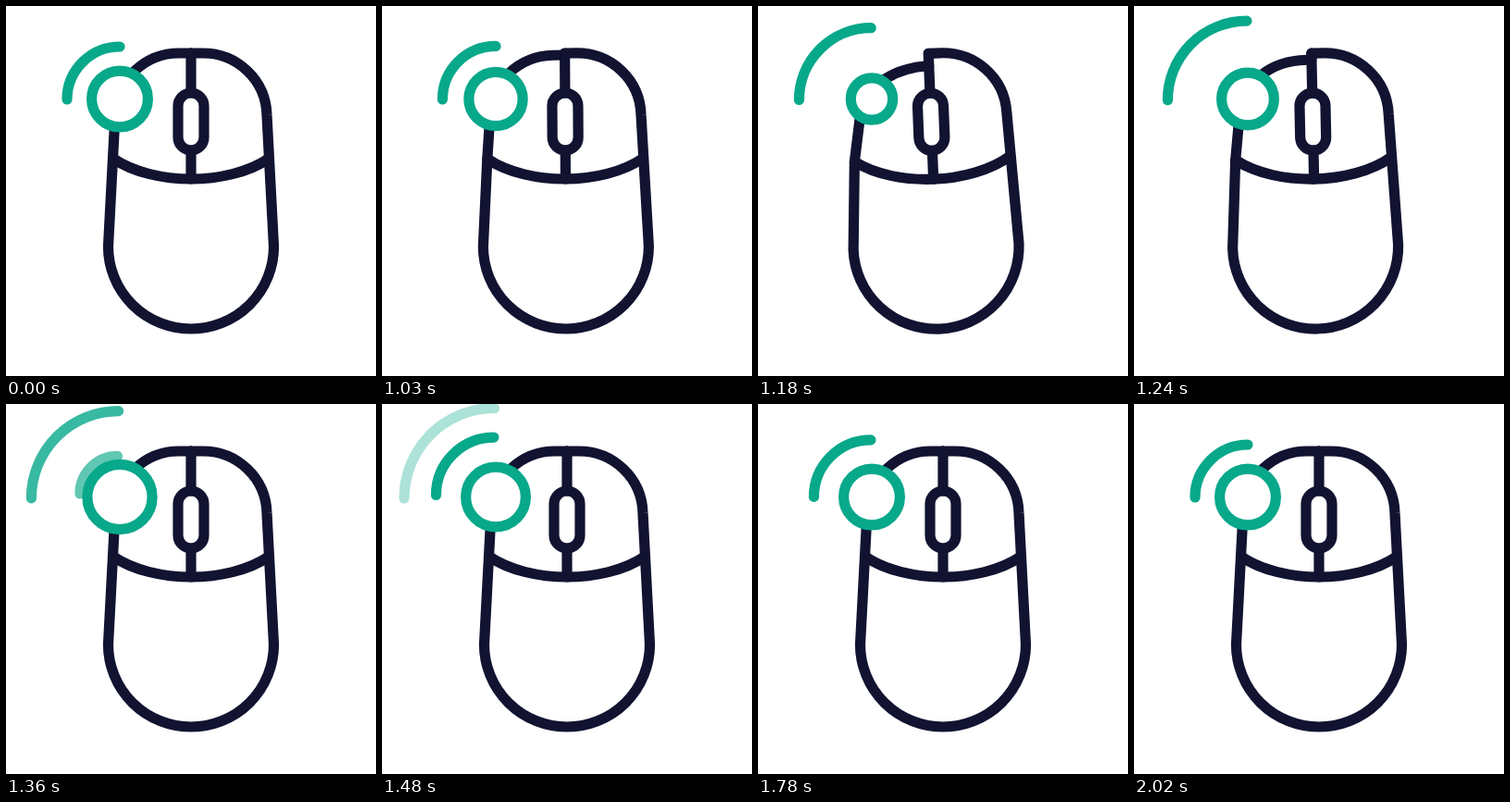
Recreate the animation shown at these times as an HTML page. Size 400x400 px, loop 2.05 s.

```html
<!DOCTYPE html>
<html lang="en">
<head>
<meta charset="utf-8">
<title>Mouse click</title>
<style>
  html, body { margin: 0; width: 100%; height: 100%; overflow: hidden; background: #fff; }
  svg { display: block; width: 100%; height: 100%; }
  svg * { stroke-width: 11.2; stroke-linecap: round; stroke-linejoin: round; }
  #mouse { fill: none; stroke: #121331; }
  #click { fill: none; stroke: #08a88a; }
  #dot { fill: #fff; }
</style>
</head>
<body>
<svg viewBox="0 0 400 400">
  <g id="mouse">
    <path d="M115.5 165 L110.5 260 A89.5 89 0 0 0 289.5 260 L282 118 C281 80 250 51 213 51 H200"/>
    <path id="button"/>
    <path d="M116 165 C138 180 170 187 200 187 S262 180 284 165"/>
    <path d="M200 51 V94 M200 156 V187"/>
    <rect x="186" y="94" width="28" height="62" rx="14"/>
  </g>
  <g id="click">
    <path id="oldWave"/>
    <path id="newWave"/>
    <circle id="dot" cx="123" cy="100.5"/>
  </g>
</svg>
<script>
const LOOP = 2050, START = 1030, STEP = 30;
const el = id => document.getElementById(id);
const mix = (a, b, k) => a + (b - a) * k;
const clamp = k => Math.min(1, Math.max(0, k));

// Cubic Bezier easing, solved by bisection
function bezier(x1, y1, x2, y2) {
  const at = (a, b, u) => 3 * (1 - u) ** 2 * u * a + 3 * (1 - u) * u * u * b + u ** 3;
  return x => {
    let lo = 0, hi = 1;
    for (let i = 0; i < 24; i++) {
      const mid = (lo + hi) / 2;
      if (at(x1, x2, mid) < x) lo = mid; else hi = mid;
    }
    return at(y1, y2, lo);
  };
}
const linear = k => k;
const smooth = k => k * k * (3 - 2 * k);
const settle = bezier(.28, 0, .25, 1);
const burst = bezier(.3, .2, .4, 1);

// Track: [time, value, easing towards this value]
function track(keys, t) {
  if (t <= keys[0][0]) return keys[0][1];
  for (let i = 1; i < keys.length; i++) {
    const [t0, v0] = keys[i - 1], [t1, v1, ease] = keys[i];
    if (t <= t1) return mix(v0, v1, ease(clamp((t - t0) / (t1 - t0))));
  }
  return keys[keys.length - 1][1];
}

const PRESS = [[1000, 0], [1133, 1, smooth], [1333, 0, smooth]];
const DOT = [[1000, 30.4], [1133, 20.8, smooth], [1340, 35.2, smooth], [1590, 30.4, smooth]];
const OLD_R = [[1000, 57], [1550, 98, settle]];
const OLD_FADE = [[1310, 1], [1565, 0, linear]];
const NEW_R = [[1300, 30], [1560, 65.5, burst], [2020, 57, smooth]];
const NEW_X = [[1360, 120.5], [1600, 121.3, smooth], [2020, 123, smooth]];
const NEW_Y = [[1360, 97], [1600, 100, smooth], [2020, 101, smooth]];
const NEW_FADE = [[1315, 0], [1385, 1, linear]];

function wave(id, x, y, r, opacity) {
  el(id).setAttribute("d", `M${x - r} ${y} A${r} ${r} 0 0 1 ${x} ${y - r}`);
  el(id).setAttribute("opacity", opacity);
}

function draw(t) {
  const p = track(PRESS, t);
  el("mouse").setAttribute("transform", `rotate(${-2.65 * p} 200 447)`);

  // Side and shoulder of the left button, from rest to pressed
  const at = (x0, y0, x1, y1) => `${mix(x0, x1, p)} ${mix(y0, y1, p)} `;
  el("button").setAttribute("d", "M115.5 165 L" + at(118, 118, 124, 118) +
    "C" + at(119, 80, 128, 92) + at(150, 51, 152, 73) + at(187, 51, 187, 67.5) +
    "L" + at(200, 51, 200, 66.5));

  el("dot").setAttribute("r", track(DOT, t));

  const r = track(OLD_R, t), k = (r - 57) / 41;
  wave("oldWave", mix(123, 121.5, k), mix(101, 102, k), r, track(OLD_FADE, t));
  wave("newWave", track(NEW_X, t), track(NEW_Y, t), track(NEW_R, t), track(NEW_FADE, t));
}

const origin = performance.now();
function tick() {
  const t = Math.max(0, performance.now() - origin) % LOOP;
  draw(t < START ? 0 : START + Math.floor((t - START) / STEP) * STEP);
  requestAnimationFrame(tick);
}
tick();
</script>
</body>
</html>
```
